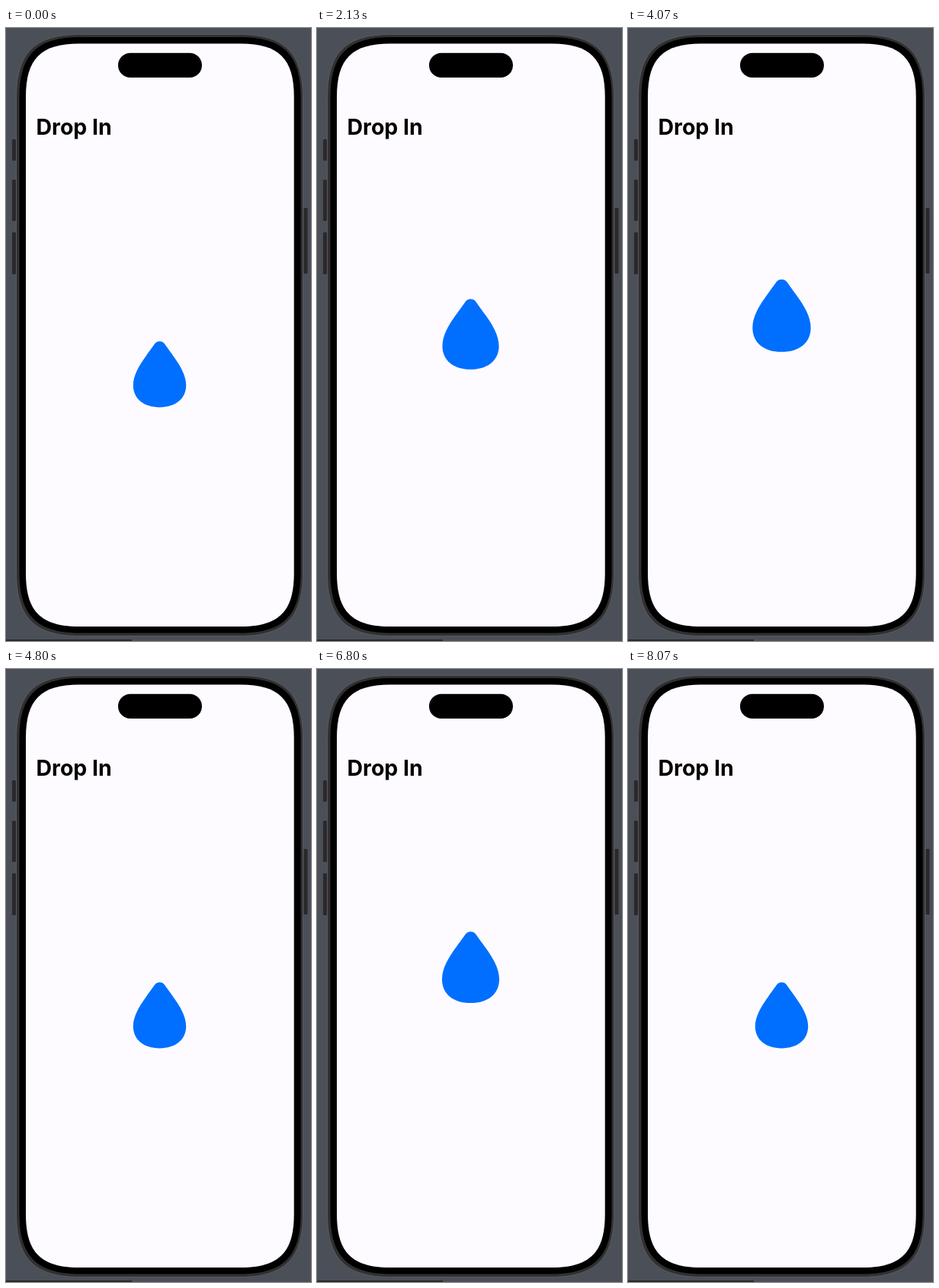
Animation, 400 px wide and 804 px high, one loop 8.14 s. Source, as an HTML page:

```html
<!DOCTYPE html>
<html lang="en">
<head>
<meta charset="utf-8">
<title>Drop In</title>
<style>
  html, body { margin: 0; width: 100%; height: 100%; overflow: hidden; background: #4b5058; }
  svg { display: block; width: 400px; height: 804px; }
  text { font: 700 28.5px Inter, "Liberation Sans", sans-serif; }
</style>
</head>
<body>
<svg viewBox="0 0 400 804">
  <rect width="400" height="804" fill="#4b5058"/>
  <rect y="802" width="165" height="2" fill="#2e2629"/>
  <g fill="#2b282b">
    <rect x="8" y="146" width="5" height="28" rx="1"/>
    <rect x="8" y="199" width="5" height="54" rx="1"/>
    <rect x="8" y="268" width="5" height="55" rx="1"/>
    <rect x="390.5" y="236" width="5" height="86" rx="1"/>
  </g>
  <path id="rim" fill="#302f31" stroke="#5a585a"/>
  <path id="bezel" fill="#000"/>
  <path id="screen" fill="#fdfbff"/>
  <rect x="147" y="32.7" width="110" height="32.3" rx="16.1"/>
  <text x="39.4" y="140">Drop In</text>
  <path id="drop" fill="#006fff" d="M0-43 C3-43 5-41.9 6.7-39.4 C9.1-35.9 13.5-30 17.4-24.6
    C26.4-12.3 34.7 1.2 34.7 14.6 C34.7 32.4 21 43.4 0 43.4 C-21 43.4-34.7 32.4-34.7 14.6
    C-34.7 1.2-26.4-12.3-17.4-24.6 C-13.5-30-9.1-35.9-6.7-39.4 C-5-41.9-3-43 0-43Z"/>
</svg>
<script>
  const $ = id => document.getElementById(id);

  // Rounded rectangle with continuous-curvature corners
  function squircle(id, l, t, r, b, radius) {
    const e = radius * 1.27, c = radius * 0.36;
    $(id).setAttribute('d',
      `M${l + e} ${t}H${r - e}C${r - c} ${t} ${r} ${t + c} ${r} ${t + e}` +
      `V${b - e}C${r} ${b - c} ${r - c} ${b} ${r - e} ${b}` +
      `H${l + e}C${l + c} ${b} ${l} ${b - c} ${l} ${b - e}` +
      `V${t + e}C${l} ${t + c} ${l + c} ${t} ${l + e} ${t}Z`);
  }
  squircle('rim', 13.5, 8.5, 389.5, 797.5, 66);
  squircle('bezel', 17.5, 12, 386.5, 793.5, 63);
  squircle('screen', 26, 20.5, 377.7, 785, 55);

  const LOOP = 8140, STEP = 1000 / 15;
  const RISE = 285, FALL = 300, LIFT = 77, GROW = 0.1;
  const PEAKS = [2016, 4060, 6711];

  // cubic-bezier(.42, 0, .58, 1)
  function easeInOut(x) {
    let lo = 0, hi = 1;
    for (let i = 0; i < 24; i++) {
      const s = (lo + hi) / 2, q = 1 - s;
      if (3 * q * q * s * 0.42 + 3 * q * s * s * 0.58 + s * s * s < x) lo = s;
      else hi = s;
    }
    return lo * lo * (3 - 2 * lo);
  }

  function height(t) {
    for (const peak of PEAKS) {
      const d = t - peak;
      if (d > -RISE && d < FALL) return easeInOut(d < 0 ? 1 + d / RISE : 1 - d / FALL);
    }
    return 0;
  }

  const start = performance.now();
  function draw(now) {
    const t = Math.max(0, now - start) % LOOP;
    const p = height(Math.floor((t + 5) / STEP) * STEP);
    $('drop').setAttribute('transform',
      `translate(201.5 ${454 - LIFT * p}) scale(${1 + GROW * p})`);
    requestAnimationFrame(draw);
  }
  draw(start);
</script>
</body>
</html>
```
